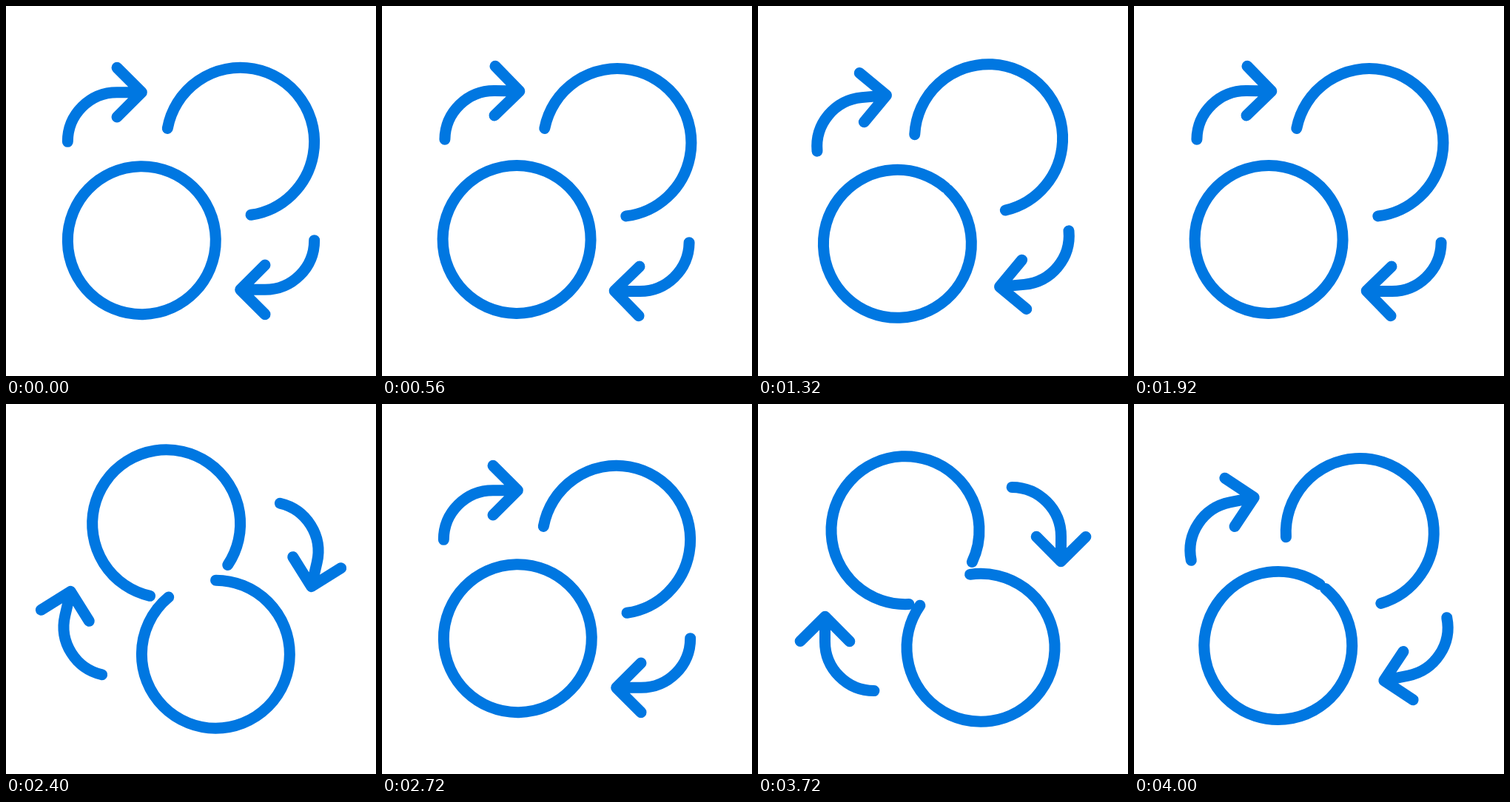
Recreate the animation shown at these times as an HTML page. Size 500 by 500 pixels, loop 4040 ms.

```html
<!DOCTYPE html>
<html lang="en">
<head>
<meta charset="utf-8">
<title>Swap</title>
<style>
  html, body { margin: 0; width: 100%; height: 100%; overflow: hidden; background: #fff; }
  svg { display: block; width: 100%; height: 100%; }
  #spin { fill: none; stroke: #0077e1; stroke-width: 15; stroke-linecap: round; stroke-linejoin: round; }
</style>
</head>
<body>
<svg viewBox="0 0 500 500">
  <g id="spin">
    <g transform="translate(183.33 316.67)"><circle id="front" r="100" pathLength="360"/></g>
    <g transform="translate(316.67 183.33)"><circle id="back" r="100" pathLength="360"/></g>
    <path id="arrow" d="M83.33 183.33A66.67 66.67 0 0 1 150 116.67H183.33M150 83.33L183.33 116.67L150 150"/>
    <use href="#arrow" transform="rotate(180 250 250)"/>
  </g>
</svg>
<script>
  const LOOP = 4040, CYCLE = 1360, HOLD = 520, TURN = 880, STEP = 40;
  const GAP = 54.3;   // half of the open angle
  const TILT = 12.3;  // arrows lag behind the turn by this much midway
  const [spin, front, back, arrow] =
    ['spin', 'front', 'back', 'arrow'].map(id => document.getElementById(id));

  const ease = u => u * u * (3 - 2 * u);

  // Opens a ring by `half` degrees on both sides of `mid`.
  function openRing(ring, mid, half) {
    ring.setAttribute('stroke-dasharray', half > 0 ? `${360 - 2 * half} ${2 * half}` : 'none');
    ring.setAttribute('transform', `rotate(${mid + half})`);
  }

  function draw(ms) {
    const t = Math.floor((ms % LOOP) / STEP) * STEP % CYCLE;
    const u = Math.max(0, (t - HOLD) / TURN);
    const e = ease(u);
    const lag = TILT * ease(1 - Math.abs(2 * u - 1));
    spin.setAttribute('transform', `rotate(${180 * e} 250 250)`);
    arrow.setAttribute('transform', `rotate(${-lag} 112.5 126.5)`);
    openRing(front, -46, GAP * e);
    openRing(back, 136, GAP * (1 - e));
  }

  const start = performance.now();
  function tick() {
    draw(performance.now() - start);
    requestAnimationFrame(tick);
  }
  tick();
</script>
</body>
</html>
```
